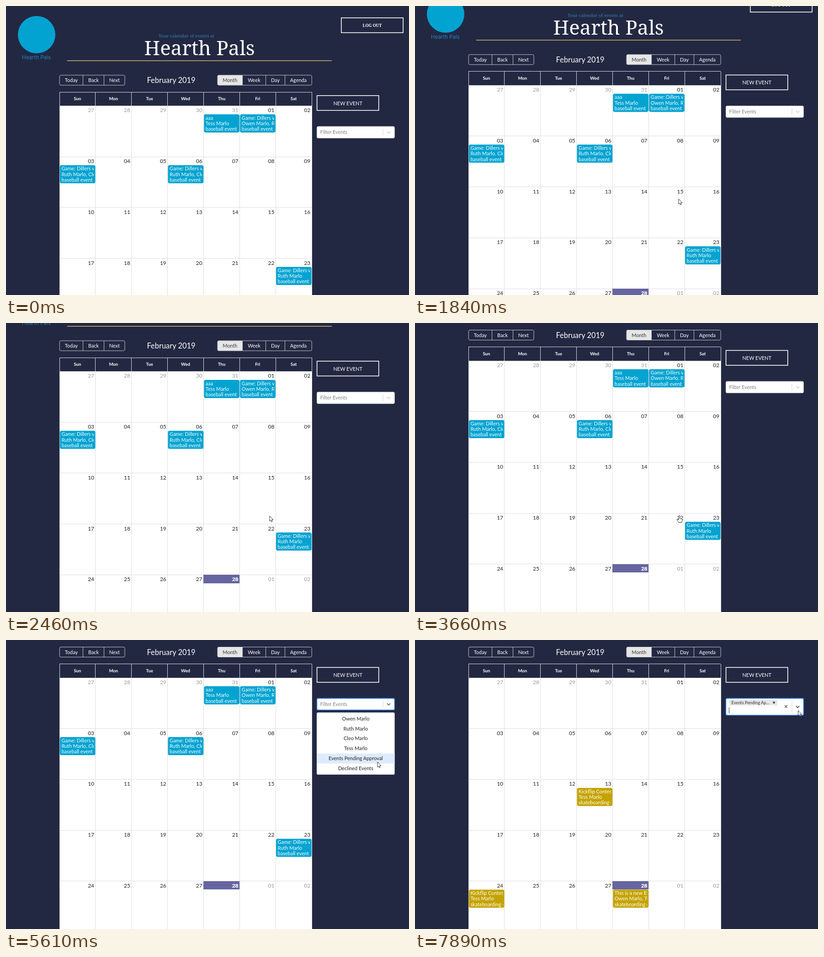
Animation of 882x635 px, one loop 8 s. Source, as an HTML page:

```html
<!DOCTYPE html>
<html lang="en">
<head>
<meta charset="utf-8">
<title>Calendar</title>
<style>
  html, body { margin: 0; width: 100%; height: 100%; overflow: hidden; background: #232842; }
  svg { display: block; }
  text { font: 10.92px Lato, sans-serif; fill: #fff; }
  .serif { font-family: "Noto Serif", serif; }
  .mid { text-anchor: middle; }
  .end { text-anchor: end; }
  .crisp { shape-rendering: crispEdges; }
</style>
</head>
<body>
<svg id="stage" width="882" height="635" viewBox="0 0 882 635">
  <g id="page">
    <g id="layout"></g>
    <g id="approved"></g>
    <g id="pending"></g>
    <g id="filter" transform="translate(680 264.5)"></g>
  </g>
  <circle id="click" r="9" fill="#f3e43a" opacity=".72"/>
  <g id="cursor" fill="#fff" stroke="#1c1c1c" stroke-width=".9" stroke-linejoin="round">
    <path id="arrow" d="M0 0V11.5L2.6 9.2 4.3 13 6 12.2 4.4 8.5H8z"/>
    <path id="hand" d="M0 8V.6a1.3 1.3 0 0 1 2.6 0V5.5l4 1q1.7.5 1.5 2.3L6.8 14.5H.8L-3.6 9q-.4-2 1.8-1.2z"/>
  </g>
</svg>
<script>
const LOOP = 8000;
const LEFT = 117, TOP = 219.5, COL = 78.87, ROW = 111.7, WIDTH = COL * 7;
const BLUE = '#02a3d1', GOLD = '#c4a300';
const MEMBERS = ['Owen Marlo', 'Ruth Marlo', 'Cleo Marlo', 'Tess Marlo'];
const [OWEN, RUTH, CLEO, TESS] = MEMBERS;
const OPTIONS = [...MEMBERS, 'Events Pending Approval', 'Declined Events'];
const OPTION_H = 21.85, MENU_TOP = 34.2, FILTER_Y = 128;

const $ = id => document.getElementById(id);
const text = (s, x, y, cls = '', style = '') =>
  `<text x="${x}" y="${y}" class="${cls}" style="${style}">${s}</text>`;
const rect = (x, y, w, h, attrs) =>
  `<rect x="${x}" y="${y}" width="${w}" height="${h}" ${attrs}/>`;
const path = (d, stroke, width = 1, attrs = '') =>
  `<path d="${d}" fill="none" stroke="${stroke}" stroke-width="${width}" ${attrs}/>`;
const cross = (x, y, r, color) =>
  path(`M${x - r} ${y - r}l${2 * r} ${2 * r}m0 ${-2 * r}l${-2 * r} ${2 * r}`, color, 1.5);

function header() {
  return '<circle cx="67" cy="63" r="41" fill="#02a3d1"/>'
    + text('Hearth Pals', 66.5, 117, 'mid', 'font:11.5px Inter,sans-serif;fill:#1e86bd')
    + text('Your calendar of events at', 395, 69, 'serif mid', 'font-size:9.8px;fill:#2b86b8')
    + text('Hearth Pals', 423.5, 108, 'serif mid', 'font-size:43.7px')
    + path('M134 120.3H713', '#d3b26b', 1.4)
    + rect(733.8, 26, 135.4, 32.6, 'fill="none" stroke="#fff" stroke-width="1.6"')
    + text('LOG OUT', 801.5, 46, 'serif mid', 'font-size:9px;font-weight:600')
    + rect(680.6, 196.8, 135.2, 32.6, 'fill="none" stroke="#fff" stroke-width="1.6"')
    + text('NEW EVENT', 748.2, 217.6, 'mid');
}

function buttons(edges, labels) {
  const x = edges[0], w = edges.at(-1) - x;
  return rect(x, 152, w, 22, 'rx="2.8" fill="none" stroke="#c4c6cc"')
    + edges.slice(1, -1).map(e => path(`M${e} 152v22`, '#c4c6cc')).join('')
    + labels.map((s, i) => text(s, (edges[i] + edges[i + 1]) / 2, 167.3, 'mid',
        s === 'Month' ? 'fill:#373a3c' : '')).join('');
}

function toolbar() {
  return buttons([117.3, 168.5, 214.5, 260], ['Today', 'Back', 'Next'])
    + text('February 2019', 361.5, 169, 'mid', 'font-size:16.4px')
    + rect(463, 152, 54.5, 22, 'rx="2" fill="#e6e6e6"')
    + buttons([463, 517.5, 568.5, 610.5, 669.2], ['Month', 'Week', 'Day', 'Agenda']);
}

function grid() {
  let out = rect(LEFT, TOP, WIDTH, ROW * 5, 'fill="#fff" class="crisp"');
  let cols = '', heads = '', rows = '';
  for (let c = 0; c <= 7; c++) {
    const x = LEFT + c * COL;
    cols += `M${x} ${TOP}v${ROW * 5}`;
    heads += `M${x} 189V${TOP}`;
  }
  for (let r = 0; r < 5; r++) rows += `M${LEFT} ${TOP + r * ROW}h${WIDTH}`;
  out += path(cols + rows, '#ddd', 1, 'class="crisp"')
    + path(`${heads}M${LEFT} 189h${WIDTH}`, '#dcdde2', 1, 'class="crisp"');
  ['Sun', 'Mon', 'Tue', 'Wed', 'Thu', 'Fri', 'Sat'].forEach((d, c) =>
    out += text(d, LEFT + (c + .5) * COL, 207.3, 'mid', 'font-size:9.6px;font-weight:700'));
  for (let i = 0; i < 35; i++) {
    const c = i % 7, y = TOP + (i - c) / 7 * ROW, x = LEFT + c * COL;
    const day = i < 5 ? 27 + i : (i - 5) % 28 + 1, today = i === 32;
    const color = today ? '#fff;font-weight:900' : i < 5 || i > 32 ? '#999' : '#222';
    if (today) out += rect(x, y, COL, 18.6, 'fill="#6665a0" class="crisp"');
    out += text(String(day).padStart(2, '0'), x + COL - 2.8, y + 13.9, 'end',
      `font-size:12px;fill:${color}`);
  }
  return out;
}

function event(row, col, color, ...lines) {
  const x = LEFT + col * COL, y = TOP + row * ROW + 18.6;
  return rect(x + .9, y, 77.6, 39.8, `rx="3.6" fill="${color}"`)
    + `<svg x="${x + 4}" y="${y}" width="71.4" height="40">`
    + lines.map((s, i) => text(s, .4, 11.6 + i * 12.3)).join('') + '</svg>';
}

const game = (row, col, who) => event(row, col, BLUE, 'Game: Dillers vs', who, 'baseball event');
const skate = (row, col, name, who) => event(row, col, GOLD, name, who, 'skateboarding event');

$('layout').innerHTML = header() + toolbar() + grid();
$('approved').innerHTML = event(0, 4, BLUE, 'aaa', TESS, 'baseball event')
  + game(0, 5, `${OWEN}, ${RUTH}`)
  + game(1, 0, `${RUTH}, ${CLEO}`)
  + game(1, 3, `${RUTH}, ${CLEO}`)
  + game(3, 6, RUTH);
$('pending').innerHTML = skate(2, 3, 'Kickflip Contest', TESS)
  + skate(4, 0, 'Kickflip Contest', TESS)
  + skate(4, 4, 'This is a new Event', `${OWEN}, ${TESS}`);

// Linear interpolation through rows of [time, ...values]
function track(keys, t) {
  const i = keys.findIndex(k => k[0] > t);
  if (i < 1) return (i ? keys.at(-1) : keys[0]).slice(1);
  const a = keys[i - 1], b = keys[i], p = (t - a[0]) / (b[0] - a[0]);
  return a.slice(1).map((v, j) => v + (b[j + 1] - v) * p);
}

const SCROLL = [[1630, 0], [1840, 45], [1940, 68.25], [2310, 68.25], [2460, 112.75], [2560, 136.5]];
const POINTER = [
  [1010, 775, 560], [1140, 577, 424], [3700, 577, 424], [3900, 640, 350], [4130, 770, 225],
  [4300, 860, 150], [4460, 842, 141], [4980, 842, 141], [5280, 835, 215], [5480, 818, 279],
  [5610, 813, 268], [5750, 813, 267], [6380, 813, 267], [6590, 829, 84], [6720, 829, 84],
  [7000, 837, 122], [7400, 841.5, 162], [7520, 841.5, 162], [7890, 838.5, 155]
];
const OPEN = 4560, PICK = 5970, BLINK = 5220;

function menu(y) {
  const active = Math.max(0, Math.min(5, Math.floor((y - FILTER_Y - MENU_TOP) / OPTION_H)));
  return rect(0, 31.3, 170.6, 136.4, 'rx="2.8" fill="#fff"')
    + rect(0, MENU_TOP + active * OPTION_H, 170.6, OPTION_H, 'fill="#deebff"')
    + OPTIONS.map((s, i) =>
        text(s, 85.4, MENU_TOP + 14.5 + i * OPTION_H, 'mid', 'fill:#222')).join('');
}

function filter(t, x, y) {
  const focus = t >= OPEN, picked = t >= PICK;
  const h = picked ? 37 : 25.5;
  const over = t > 1010 && x > 680 && x < 851 && y > FILTER_Y && y < FILTER_Y + h;
  const chevron = focus ? (over ? '#333' : '#555') : over ? '#999' : '#ccc';
  const caretOn = focus && (t < BLINK || Math.floor((t - BLINK) / 500) % 2);
  let out = rect(.4, .2, 170, h,
    `rx="2.8" fill="#fff" stroke="${focus ? '#2684ff' : over ? '#b3b3b3' : '#ccc'}" stroke-width="${focus ? 1.5 : .9}"`);
  if (picked) {
    out += rect(7.5, 3, 105.5, 12.8, 'rx="1.4" fill="#e6e6e6"')
      + text('Events Pending Ap...', 12.5, 12.7, '', 'font-size:9.3px;fill:#333')
      + cross(105.6, 9.4, 1.9, '#222')
      + cross(132, 18.2, 2.8, '#666');
  } else {
    out += text('Filter Events', 7.4, 16.5, '', 'fill:#808080');
  }
  if (caretOn) out += path(picked ? 'M7.5 20v13' : 'M7.5 7v12.5', '#222', .9);
  out += path(`M145 5.8v${h - 11.4}`, '#ccc', .9)
    + path(`M153.9 ${h / 2 - 1.5}l3.6 3.6 3.6-3.6`, chevron, 1.5);
  return focus && !picked ? out + menu(y) : out;
}

function show(id, on) { $(id).style.display = on ? '' : 'none'; }

function draw() {
  const t = performance.now() % LOOP;
  const [scroll] = track(SCROLL, t), [x, y] = track(POINTER, t);
  const hand = t >= 3660 && t < 3720;
  $('page').setAttribute('transform', `translate(0 ${-scroll})`);
  $('filter').innerHTML = filter(t, x, y);
  show('approved', t < PICK);
  show('pending', t >= PICK);
  show('click', t >= OPEN && t < 4690 || t >= 5890 && t < 6040);
  $('click').setAttribute('transform', `translate(${x - 1} ${y + .5})`);
  show('cursor', t >= 1010);
  $('cursor').setAttribute('transform', `translate(${x} ${y})`);
  show('arrow', !hand);
  show('hand', hand);
  requestAnimationFrame(draw);
}
draw();
</script>
</body>
</html>
```
